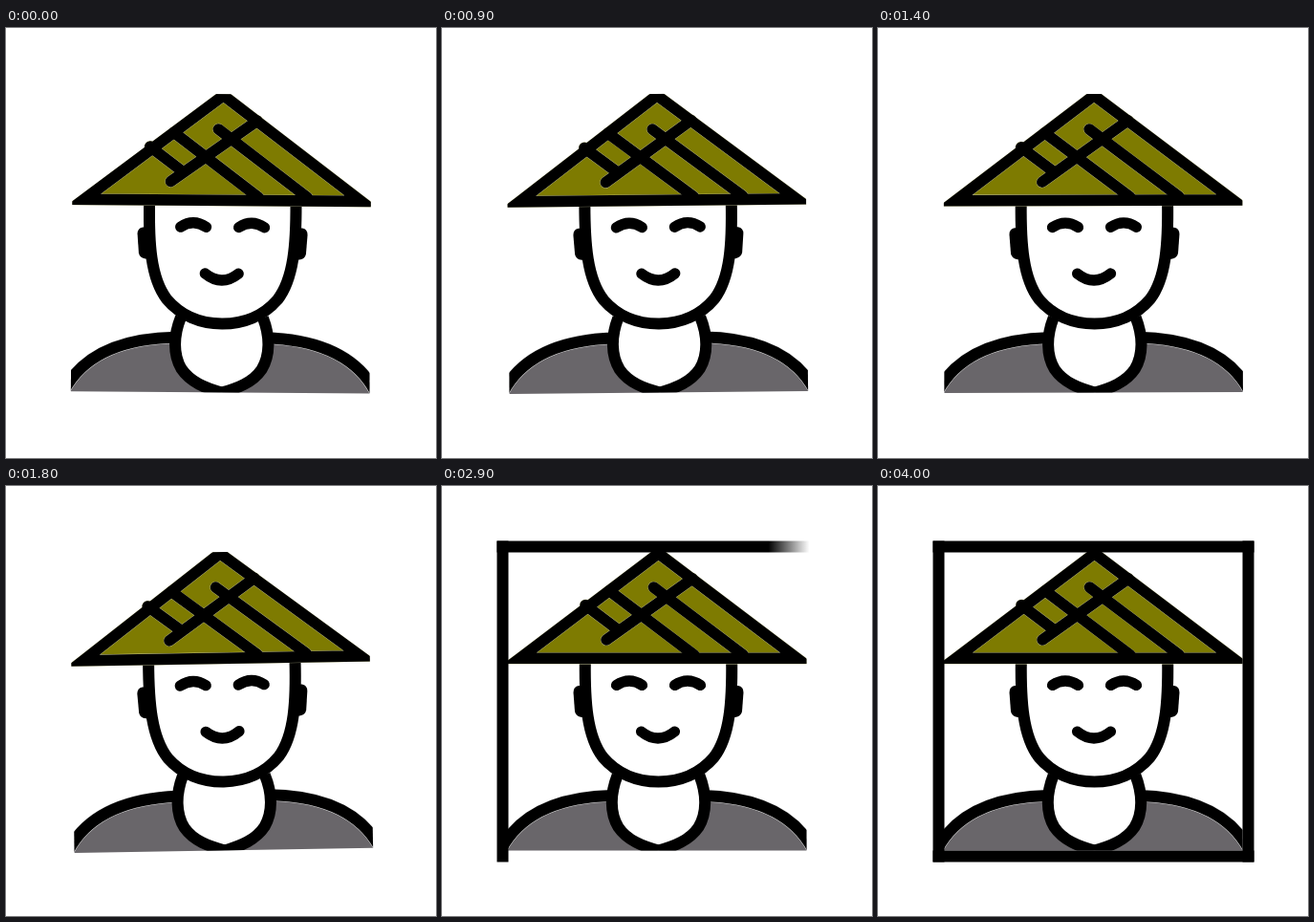
Write an HTML page that moves like this. It is 450 px wide and 450 px high and loops after 4.1 s.

```html
<!DOCTYPE html>
<html lang="en">
<head>
<meta charset="utf-8">
<title>Farmer portrait</title>
<style>
html, body { margin: 0; width: 100%; height: 100%; overflow: hidden; background: #fff; }
svg { display: block; width: 100vw; height: 100vh; }
</style>
</head>
<body>
<svg viewBox="0 0 450 450" xmlns="http://www.w3.org/2000/svg">
  <defs>
    <clipPath id="crop"><rect x="69" y="69" width="312.5" height="312.5"/></clipPath>
    <g id="hat">
      <path d="M81.5 180.3L226.5 70.6L371.5 180.3Z"/>
      <path stroke-linecap="round" d="M172 161L262 97M221.500 106L315 176.600M175 109.700L264 177M150 124.700L184 150.300"/>
    </g>
    <g id="shoulders">
      <path id="shoulder" d="M178 324C135 325 90 336 66 373L60 383"/>
      <use href="#shoulder" transform="matrix(-1 0 0 1 450 0)"/>
    </g>
  </defs>
  <g id="man" fill="none" stroke="#000" stroke-width="12">
    <g clip-path="url(#crop)">
      <path d="M178 324C135 325 90 336 66 373L60 390H390L384 373C360 336 315 325 272 324Z" fill="#69666a" stroke="none"/>
      <use href="#shoulders" stroke="#ddd" stroke-width="13"/>
      <use href="#shoulders"/>
      <path d="M183.500 303C176 322 175.500 342 184.500 357C194 371 210 377 226.500 381.500C243 377 259 371 268.500 357C277.500 342 277 322 269.500 303" fill="#fff"/>
      <path id="ear" d="M152 209H143Q137.500 210 137.500 216L139 236Q140 241 146 242H154Z" fill="#000" stroke="none"/>
      <use href="#ear" transform="matrix(-1 0 0 1 453 0)"/>
      <path d="M149.800 183C149.300 225 151.500 262 168.500 284C183 301 204 309.500 226.500 309.500C249 309.500 270 301 284.500 284C301.500 262 303.700 225 303.200 183" fill="#fff"/>
      <path stroke-width="11.200" stroke-linecap="round" d="M182.500 208.500Q196 199.500 209.500 208.500M243.500 208.500Q257 199.500 270.500 208.500M208.500 257Q226 271 243.500 257"/>
      <path d="M81.500 180.300L226.500 70.600L371.500 180.300Z" fill="#7e7b01" stroke="none"/>
      <use href="#hat" stroke="#cfcfa0" stroke-width="12.200"/>
      <use href="#hat" stroke-width="11.600"/>
    </g>
  </g>
  <g id="frame"></g>
</svg>
<script>
const LOOP = 4100, SWAY = 2.2, SOFT = 43;
const LOW = 57.5, HIGH = 393.5, BAR = 12, SIDE = HIGH - LOW;
const WIPE_START = 1981, WIPE_STEP = 505, WIPE_TIME = 481;

// Swing phase in radians over time in ms
const swing = [[0, 0.183], [500, 2.866], [600, 3.516], [900, 6.007], [1400, 9.49], [1870, 4 * Math.PI]];

const man = document.getElementById('man');
const frame = document.getElementById('frame');

function add(parent, tag, attrs) {
  const el = document.createElementNS('http://www.w3.org/2000/svg', tag);
  for (const key in attrs) el.setAttribute(key, attrs[key]);
  return parent.appendChild(el);
}

// Sides in drawing order: left, top, right, bottom
const sides = [
  { x: LOW, y: LOW, axis: 'y', from: HIGH, dir: -1 },
  { x: LOW, y: LOW, axis: 'x', from: LOW, dir: 1 },
  { x: HIGH - BAR, y: LOW, axis: 'y', from: LOW, dir: 1 },
  { x: LOW, y: HIGH - BAR, axis: 'x', from: HIGH, dir: -1 }
].map((side, i) => {
  const fade = add(frame, 'linearGradient', {
    id: 'fade' + i, gradientUnits: 'userSpaceOnUse', x1: 0, y1: 0, x2: 0, y2: 0
  });
  add(fade, 'stop', { offset: 0, 'stop-color': '#000' });
  add(fade, 'stop', { offset: 1, 'stop-color': '#000', 'stop-opacity': 0 });
  const upright = side.axis === 'y';
  const bar = add(frame, 'rect', {
    x: side.x, y: side.y,
    width: upright ? BAR : SIDE, height: upright ? SIDE : BAR,
    fill: `url(#fade${i})`
  });
  return { ...side, fade, bar };
});

function angle(t) {
  for (let i = 1; i < swing.length; i++) {
    const [t0, p0] = swing[i - 1], [t1, p1] = swing[i];
    if (t < t1) return SWAY * Math.sin(p0 + (p1 - p0) * (t - t0) / (t1 - t0));
  }
  return 0;
}

function render(t) {
  man.setAttribute('transform', `rotate(${angle(t)} 225 225)`);
  sides.forEach(({ axis, from, dir, fade, bar }, i) => {
    const k = Math.min(1, (t - WIPE_START - i * WIPE_STEP) / WIPE_TIME);
    bar.setAttribute('visibility', k > 0 ? 'visible' : 'hidden');
    if (k <= 0) return;
    const lead = k * (SIDE + SOFT);
    fade.setAttribute(axis + '1', from + dir * (lead - SOFT));
    fade.setAttribute(axis + '2', from + dir * lead);
  });
}

const start = performance.now();
function tick() {
  render((performance.now() - start) % LOOP);
  requestAnimationFrame(tick);
}
render(0);
requestAnimationFrame(tick);
</script>
</body>
</html>
```
